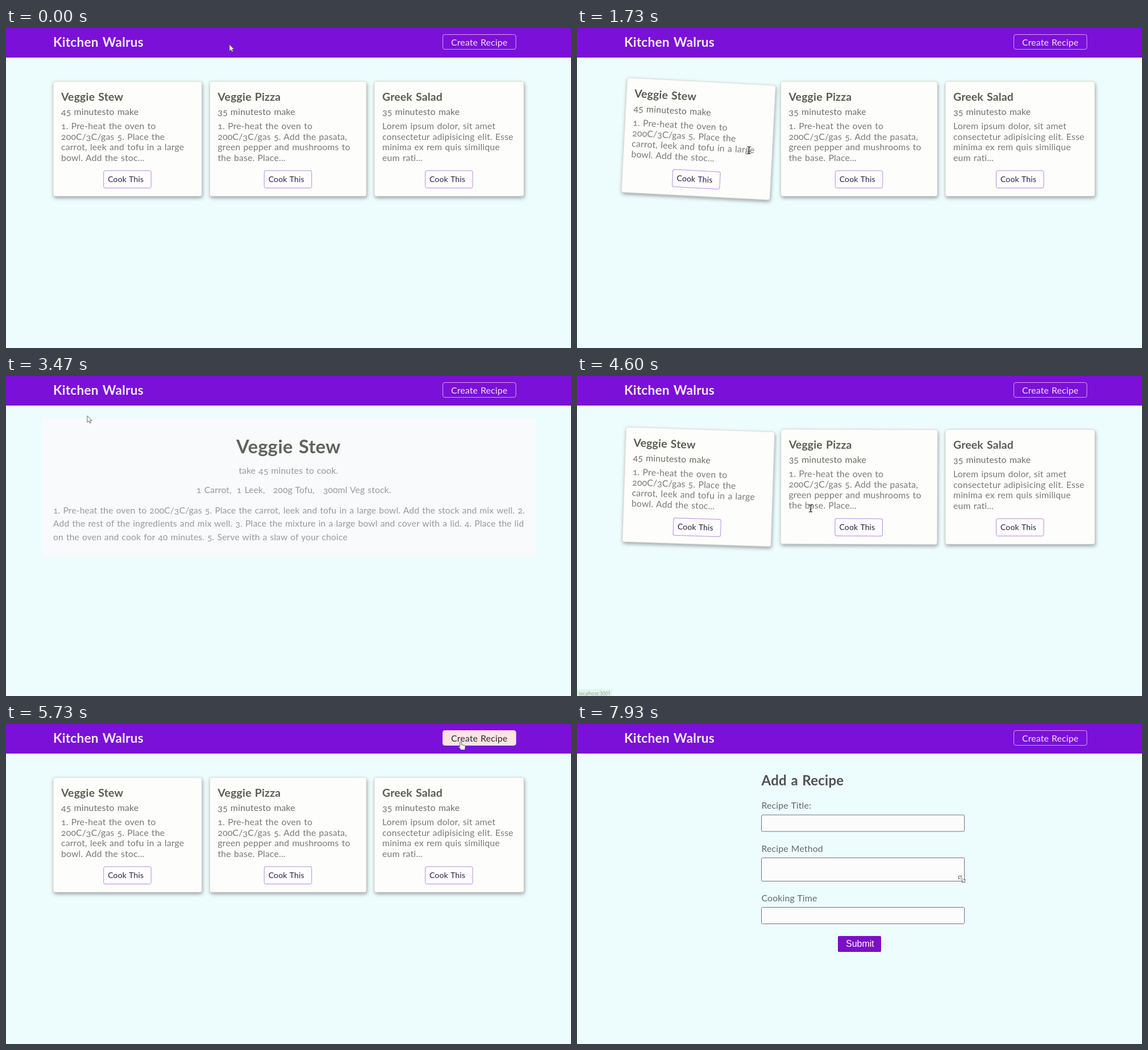
An HTML page that plays this animation: 994x563 px, repeating every 8 s.

```html
<!DOCTYPE html>
<html lang="en">
<head>
<meta charset="utf-8">
<title>Recipes</title>
<style>
html, body { margin: 0; width: 100%; height: 100%; overflow: hidden; }
body { background: #edfdfe; }
svg { display: block; }
text {
  font: 15.8px Lato, sans-serif;
  font-variant-numeric: oldstyle-nums;
  letter-spacing: .01em; word-spacing: .06em;
  fill: #7a7a77; white-space: pre;
}
.logo { font-size: 22.7px; font-weight: 700; fill: #f6eeff; }
.link rect { fill: transparent; stroke: #cfa6f6; }
.link text { fill: #f1e4ff; }
.link.hover rect { fill: #fde4e0; stroke: #fde4e0; }
.link.hover text { fill: #302838; }
.paper { fill: #fdfdfc; stroke: #d2d0c8; stroke-width: .7; filter: drop-shadow(1px 3px 3px #5558); }
.card .title { font-size: 19.4px; font-weight: 700; fill: #5b5b51; }
.card .time { fill: #6e6e67; }
.button rect { fill: #fffdff; stroke: #b98ae6; }
.button text { font-size: 14px; fill: #292047; }
.button.hover rect { fill: #ffdfbe; }
.heading { font-size: 32.6px; font-weight: 700; fill: #62625a; }
.middle { text-anchor: middle; }
#detail text:not(.heading) { font-size: 15.6px; fill: #9a9a9c; }
#form .heading { font-size: 24px; fill: #505050; }
#form text { fill: #66666a; }
#form .field { fill: #fcfcfd; stroke: #70708a; }
#form .submit { font: 16px "Liberation Sans", Arial, sans-serif; letter-spacing: 0; fill: #fff; }
#status rect { fill: #e2f5ea; }
#status text { font: 8.3px "Open Sans", sans-serif; letter-spacing: 0; fill: #8c9a90; }
#cursors path { fill: #fff; stroke: #555; stroke-width: .9; stroke-linejoin: round; }
#cursors #beam { fill: none; stroke: #333; stroke-width: 1.3; }
</style>
</head>
<body>
<svg width="994" height="563" viewBox="0 0 994 563">
  <rect width="994" height="52" fill="#7b10d8"/>
  <text class="logo" x="83" y="33">Kitchen Walrus</text>
  <g class="link" id="create">
    <rect x="768.5" y="11.5" width="128.5" height="26" rx="3.5"/>
    <text x="783" y="31">Create Recipe</text>
  </g>
  <g id="home"></g>
  <g id="detail"></g>
  <g id="form"></g>
  <g id="status"><rect y="551" height="12"/><text x="3" y="561.5"></text></g>
  <g id="cursors">
    <path id="arrow" d="M0 0V11.5L2.7 9L4.5 13L6.4 12.2L4.7 8.3H8.2Z"/>
    <path id="hand" d="M-1.3 1Q0 -1 1.3 1V5.5L7 6.8Q8.5 7.4 8 10L7 14.5H.5L-3.4 9.3Q-3.6 7.3 -1.3 8.6Z"/>
    <path id="beam" d="M-3 -6H-1L0 -5L1 -6H3M0 -5V5M-3 6H-1L0 5L1 6H3M-1.5 2H1.5"/>
    <path id="resize" d="M-5.5 -5.5H0L-1.8 -3.6L3.6 1.8L5.5 0V5.5H0L1.8 3.6L-3.6 -1.8L-5.5 0Z"/>
  </g>
</svg>
<script>
const LOOP = 8000, STEP = 200 / 3, TICK = 5;
const TILT = 3, TILT_TIME = 280;
const STATUS_DELAY = 350, STATUS_LINGER = 620;
const $ = id => document.getElementById(id);
const text = (x, y, s, cls = '') => `<text x="${x}" y="${y}" class="${cls}">${s}</text>`;
const lines = (x, y, gap, list) => list.map((s, i) => text(x, y + i * gap, s)).join('');

const cards = [
  { x: 83, w: 261.5, title: 'Veggie Stew', time: 45, method: [
    '1. Pre-heat the oven to', '200C/3C/gas 5. Place the',
    'carrot, leek and tofu in a large', 'bowl. Add the stoc...'] },
  { x: 358.5, w: 275.5, title: 'Veggie Pizza', time: 35, method: [
    '1. Pre-heat the oven to', '200C/3C/gas 5. Add the pasata,',
    'green pepper and mushrooms to', 'the base. Place...'] },
  { x: 648, w: 263, title: 'Greek Salad', time: 35, method: [
    'Lorem ipsum dolor, sit amet', 'consectetur adipisicing elit. Esse',
    'minima ex rem quis similique', 'eum rati...'] }
];
for (const c of cards) {
  c.middle = c.x + c.w / 2;
  c.button = c.middle - 42;
}

$('home').innerHTML = cards.map(c => `<g class="card">
  <rect class="paper" x="${c.x}" y="94" width="${c.w}" height="202" rx="3.5"/>
  ${text(c.x + 14, 128, c.title, 'title')}
  ${text(c.x + 14, 153, c.time + ' minutesto make', 'time')}
  ${lines(c.x + 14, 178, 18.5, c.method)}
  <g class="button"><rect x="${c.button}" y="251" width="83.5" height="30.5" rx="3"/>
  ${text(c.button + 7.5, 271, 'Cook This')}</g></g>`).join('');

$('detail').innerHTML = '<rect x="64" y="74" width="868" height="243" fill="#f8fafb"/>' +
  text(497, 136, 'Veggie Stew', 'heading middle') +
  text(497, 172, 'take 45 minutes to cook.', 'middle') +
  text(335, 206, '1 Carrot,') + text(406, 206, '1 Leek,') +
  text(470, 206, '200g Tofu,') + text(558, 206, '300ml Veg stock.') +
  lines(83, 242, 23.3, [
    '1. Pre-heat the oven to 200C/3C/gas 5. Place the carrot, leek and tofu in a large bowl. Add the stock and mix well. 2.',
    'Add the rest of the ingredients and mix well. 3. Place the mixture in a large bowl and cover with a lid. 4. Place the lid',
    'on the oven and cook for 40 minutes. 5. Serve with a slaw of your choice']);

const fields = [['Recipe Title:', 160, 29], ['Recipe Method', 235.5, 41], ['Cooking Time', 322.5, 29]];
$('form').innerHTML = text(324.5, 108, 'Add a Recipe', 'heading') +
  fields.map(([label, y, h]) => text(324.5, y - 11, label) +
    `<rect class="field" x="324.5" y="${y}" width="357" height="${h}" rx="2"/>`).join('') +
  '<rect x="459" y="373" width="76" height="28" rx="2" fill="#7a0fc4"/>' +
  text(473, 392, 'Submit', 'submit');

const spots = {
  header: [393, 29], pizza: [524, 193], stew: [300, 215], cook: [171, 257],
  corner: [143, 70], logo: [150, 30], gap: [350, 220], base: [411, 233],
  create: [800, 31], method: [560, 230], grip: [677, 273]
};
// The pointer rests between moves; sway swings it sideways on the way.
const moves = [
  { from: 0, to: 620, spot: 'pizza', sway: -260 },
  { from: 930, to: 1730, spot: 'stew', sway: 230 },
  { from: 1730, to: 2500, spot: 'cook', sway: 100 },
  { from: 2930, to: 3470, spot: 'corner' },
  { from: 3470, to: 3700, spot: 'logo' },
  { from: 4000, to: 4540, spot: 'gap' },
  { from: 4540, to: 4600, spot: 'base' },
  { from: 4600, to: 5530, spot: 'create' },
  { from: 6230, to: 6900, spot: 'method' },
  { from: 6900, to: 7800, spot: 'grip', sway: 60 }
];
const pages = [
  { from: 0, name: 'home' }, { from: 2800, name: 'detail' },
  { from: 4000, name: 'home' }, { from: 6230, name: 'form' }
];

const ease = p => p * p * (3 - 2 * p);
const clamp = p => Math.min(1, Math.max(0, p));
const pageAt = t => pages.findLast(p => p.from <= t);
const inside = ([px, py], x, y, w, h) => px >= x && px <= x + w && py >= y && py <= y + h;

const onCard = (pos, c) => inside(pos, c.x, 94, c.w, 202);
const onText = (pos, c) => inside(pos, c.x + 14, 112, c.w - 28, 126);
const onButton = (pos, c) => inside(pos, c.button - 4, 250, 88, 32);
const onCreate = pos => inside(pos, 768, 11, 130, 27);
const onLogo = pos => inside(pos, 83, 12, 160, 28);

function pointer(t) {
  const i = moves.findLastIndex(m => m.from <= t);
  const { from, to, spot, sway = 0 } = moves[i];
  const [ax, ay] = spots[i ? moves[i - 1].spot : 'header'];
  const [bx, by] = spots[spot];
  const p = clamp((t - from) / (to - from)), e = ease(p);
  return [ax + (bx - ax) * e + sway * Math.sin(2 * Math.PI * p), ay + (by - ay) * e];
}

// Replays hovering since the page opened, so the tilt depends on time alone.
function tilts(t) {
  const progress = cards.map(() => 0);
  for (let s = pageAt(t).from; s < t; s += TICK) {
    const pos = pointer(s);
    cards.forEach((c, i) => {
      progress[i] = clamp(progress[i] + (onCard(pos, c) ? TICK : -TICK) / TILT_TIME);
    });
  }
  return progress.map(p => TILT * ease(p));
}

function linkAt(t) {
  const pos = pointer(t);
  if (onCreate(pos)) return 'localhost:3001/create';
  if (onLogo(pos)) return 'localhost:3001';
  const i = pageAt(t).name === 'home' ? cards.findIndex(c => onButton(pos, c)) : -1;
  return i < 0 ? '' : 'localhost:3001/recipes/' + (i + 1);
}

function statusAt(t) {
  for (let s = t - STATUS_DELAY; s >= Math.max(0, t - STATUS_LINGER); s -= TICK) {
    const link = linkAt(s);
    if (link) return link;
  }
  return '';
}

function cursorAt(t) {
  const pos = pointer(t), page = pageAt(t).name;
  if (linkAt(t)) return 'hand';
  if (page === 'home' && cards.some(c => onText(pos, c))) return 'beam';
  if (page === 'form') {
    if (inside(pos, 668, 262, 14, 14)) return 'resize';
    if (fields.some(([, y, h]) => inside(pos, 324, y, 358, h))) return 'beam';
  }
  return 'arrow';
}

const cardNodes = [...document.querySelectorAll('.card')];
const [statusBox, statusText] = $('status').children;

function draw(t) {
  const page = pageAt(t).name, pos = pointer(t), status = statusAt(t), cursor = cursorAt(t);
  for (const id of ['home', 'detail', 'form']) $(id).style.display = id === page ? '' : 'none';
  $('create').classList.toggle('hover', onCreate(pos));

  if (page === 'home') {
    const angles = tilts(t);
    cards.forEach((c, i) => {
      cardNodes[i].setAttribute('transform', `rotate(${angles[i]} ${c.middle} 195)`);
      cardNodes[i].querySelector('.button').classList.toggle('hover', onButton(pos, c));
    });
  }

  $('status').style.display = status ? '' : 'none';
  statusText.textContent = status;
  statusBox.setAttribute('width', 4 + status.length * 4.1);

  for (const node of $('cursors').children) node.style.display = node.id === cursor ? '' : 'none';
  $(cursor).setAttribute('transform', `translate(${pos})`);
}

const begin = performance.now();
function frame() {
  const t = (performance.now() - begin) % LOOP;
  draw(Math.floor((t + 5) / STEP) % 120 * STEP);
  requestAnimationFrame(frame);
}
frame();
</script>
</body>
</html>
```
